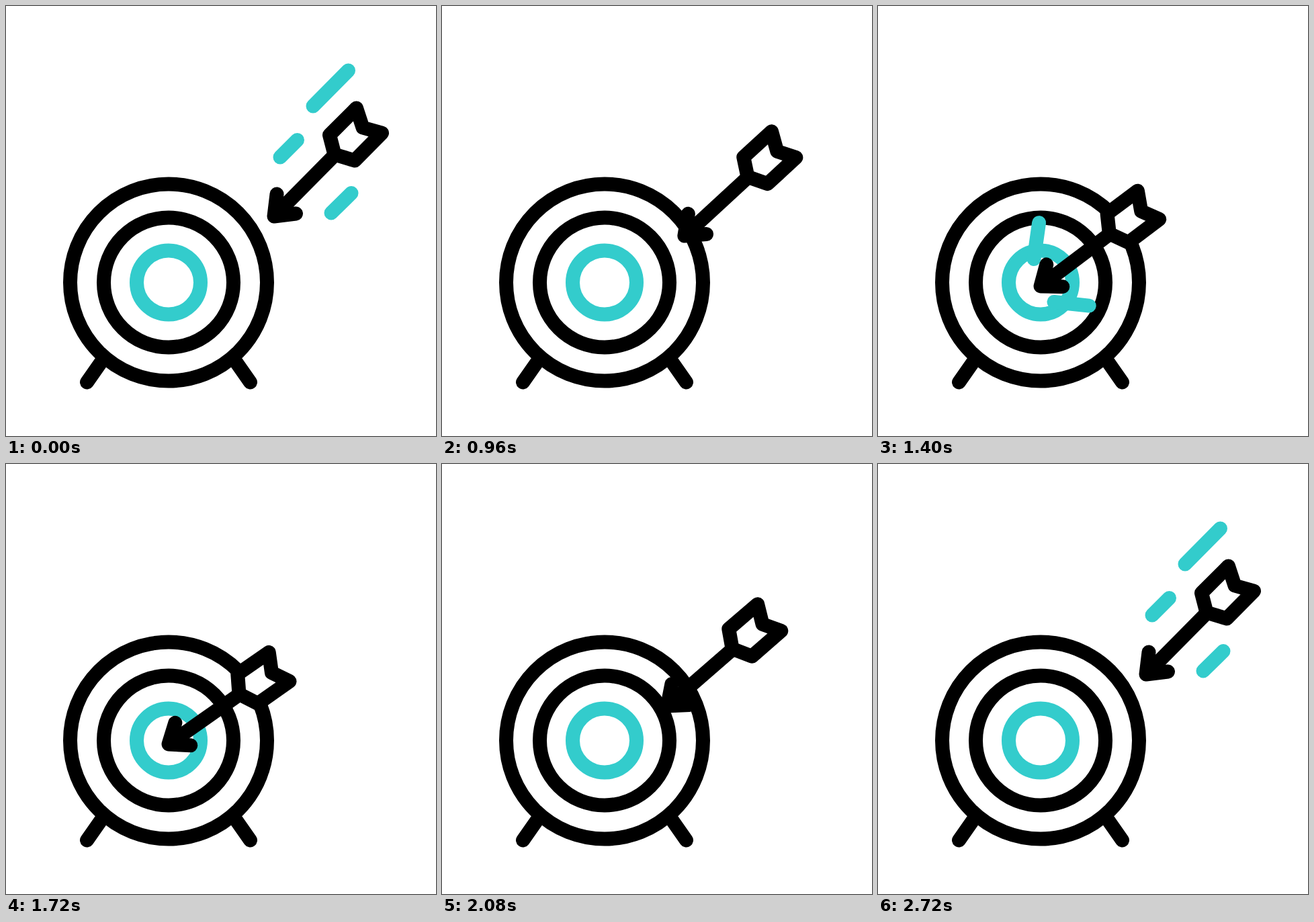
Animation of 640 by 640 pixels, one loop 2.76 s. Source, as an HTML page:

```html
<!DOCTYPE html>
<html>
<head>
<meta charset="utf-8">
<style>
  html, body { margin: 0; height: 100%; overflow: hidden; background: #fff; }
  svg { display: block; width: 100%; height: 100%; }
  svg * { stroke-width: 21; stroke-linecap: round; stroke-linejoin: round; }
</style>
</head>
<body>
<svg viewBox="0 0 640 640" fill="none" stroke="#000">
  <path d="M120.500 560L145 525M363.500 560L339 525"/>
  <circle cx="242" cy="411.500" r="146.500"/>
  <circle cx="242" cy="411.500" r="96.500"/>
  <circle cx="242" cy="411.500" r="47.500" stroke="#3cc"/>
  <g id="streaks" stroke="#3cc"></g>
  <g id="arrow">
    <path d="M489 222L399 313M403 280L399 313L431.500 309"/>
    <path fill="#fff" d="M521.500 152L531 181L559.500 189L519 230L489 221L481.500 192Z"/>
  </g>
</svg>
<script>
const LOOP = 2760, STEP = 40;
const arrow = document.getElementById('arrow');
const streaks = document.getElementById('streaks');

const progress = (t, start, end) => Math.min(1, Math.max(0, (t - start) / (end - start)));
const easeIn = (u, power) => u ** power;
const easeOut = (u, power) => 1 - (1 - u) ** power;

function makeStreak(coords) {
  const el = document.createElementNS('http://www.w3.org/2000/svg', 'path');
  streaks.append(el);
  return { el, coords };
}

const speedLines = [[457, 149, 509.5, 96], [408, 225, 433.500, 199.5], [484, 308, 514, 278.5]].map(makeStreak);
const impactLines = [[232, 376.5, 243.5, 295], [262, 440.5, 341, 449]].map(makeStreak);

// Shows only the part of a streak between two fractions of its length.
function trim({ el, coords: [x1, y1, x2, y2] }, from, to) {
  const at = u => `${x1 + (x2 - x1) * u} ${y1 + (y2 - y1) * u}`;
  el.setAttribute('d', to - from > 0.001 ? `M${at(from)}L${at(to)}` : '');
}

function draw(t) {
  const flight = t < 1840
    ? easeIn(progress(t, 600, 1228), 2.46)
    : 1 - easeOut(progress(t, 1865, 2720), 3);

  // Damped quiver around the tip after the hit.
  const since = t - 1228;
  const quiver = since > 0 && since < 490
    ? 3.6 * (1 - since / 490) * Math.sin(since / 260 * 2 * Math.PI)
    : 0;
  arrow.setAttribute('transform', `rotate(${quiver} 242 417) rotate(${10.25 * flight} -259 -510)`);

  const speed = t < 1200
    ? 1 - easeIn(progress(t, 600, 900), 2)
    : easeOut(progress(t, 2400, 2720), 2);
  speedLines.forEach(line => trim(line, 0, speed));

  const head = easeOut(progress(t, 1228, 1640), 2);
  const tail = easeIn(progress(t, 1400, 1660), 1.5);
  impactLines.forEach(line => trim(line, tail, head));
}

const begin = performance.now();
function frame() {
  const t = (performance.now() - begin) % LOOP;
  draw(Math.floor(t / STEP) * STEP);
  requestAnimationFrame(frame);
}
frame();
</script>
</body>
</html>
```
